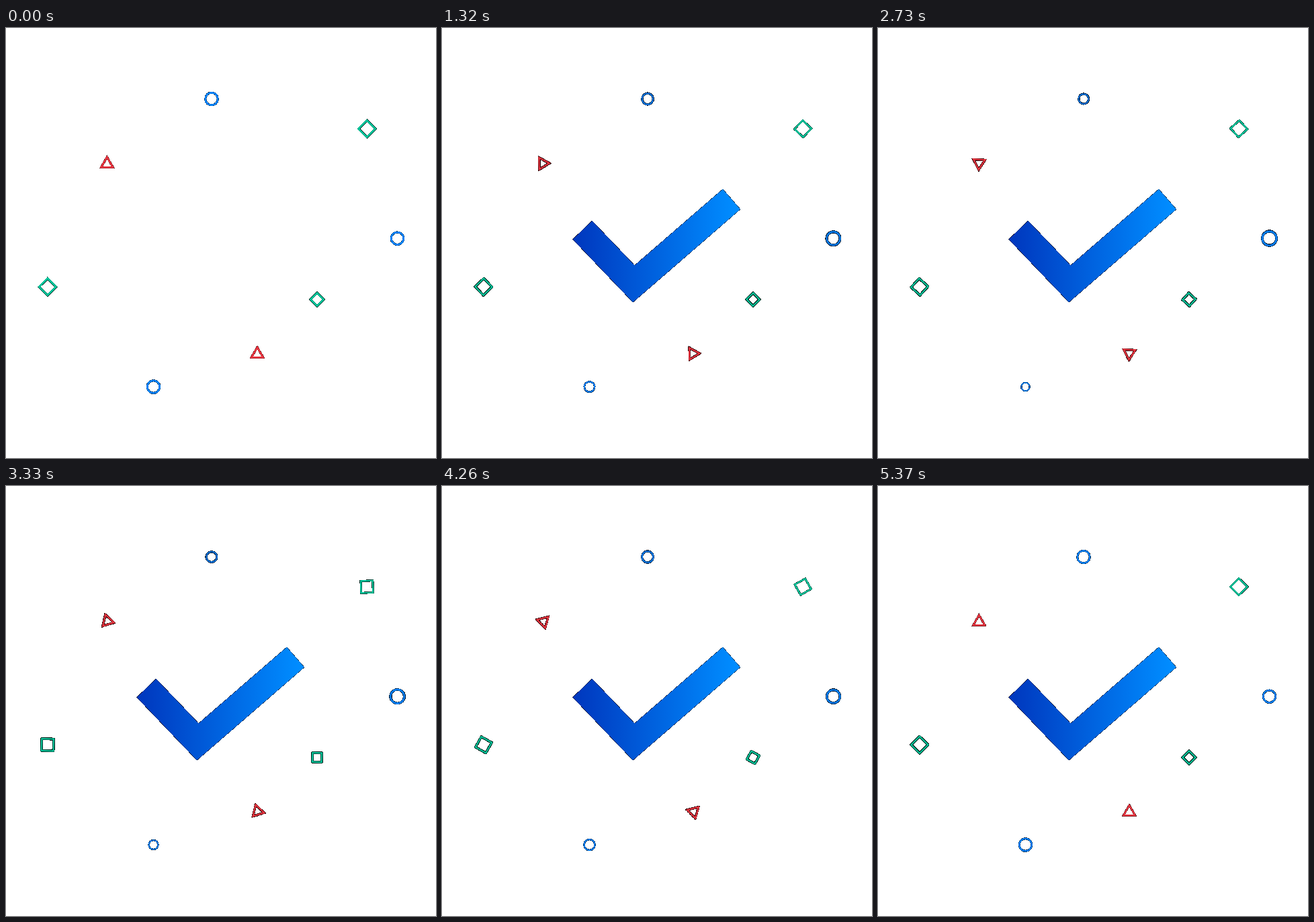
An HTML page for the animation above (5430 ms loop, 640 by 640 pixels).

```html
<!DOCTYPE html>
<html lang="en">
<head>
<meta charset="utf-8">
<title>Check mark</title>
<style>
  html, body { margin: 0; width: 100%; height: 100%; overflow: hidden; background: #fff; }
  svg { display: block; width: 100vw; height: 100vh; }
</style>
</head>
<body>
<svg viewBox="0 0 640 640" fill="none" stroke-miterlimit="10">
  <defs>
    <linearGradient id="blue" gradientUnits="userSpaceOnUse" x1="205" y1="300" x2="435" y2="300">
      <stop offset="0" stop-color="#003ac0"/>
      <stop offset="1" stop-color="#008cff"/>
    </linearGradient>
    <!-- Blends soft edges with black and makes them opaque: a hard, dark rim -->
    <filter id="rim" filterUnits="userSpaceOnUse" x="0" y="0" width="640" height="640"
            color-interpolation-filters="sRGB">
      <feFlood flood-color="#000" result="black"/>
      <feComposite in="SourceGraphic" in2="black" operator="over" result="onBlack"/>
      <feComponentTransfer in="SourceGraphic" result="mask">
        <feFuncA type="discrete" tableValues="0 1 1 1 1 1 1 1 1 1"/>
      </feComponentTransfer>
      <feComposite in="onBlack" in2="mask" operator="in"/>
    </filter>
  </defs>
  <g filter="url(#rim)">
    <g id="art"></g>
    <use id="overlay" href="#art"/>
  </g>
</svg>
<script>
const STEP = 30, LAST = 179, LOOP = 5430;
const CHECK_END = 28.3;   // step at which the tick is fully drawn
const PULSE_MID = 87;     // step at which the circles turn back
const LINE = 2.5;

const art = document.getElementById('art');
const overlay = document.getElementById('overlay');

function add(tag, stroke, attrs) {
  const el = document.createElementNS('http://www.w3.org/2000/svg', tag);
  const all = { stroke, 'stroke-width': LINE, ...attrs };
  for (const key in all) el.setAttribute(key, all[key]);
  art.append(el);
  return el;
}

function square(x, y, side, spin) {
  const box = { x: -side / 2, y: -side / 2, width: side, height: side };
  return { x, y, spin, start: 45, el: add('rect', '#00c79c', box) };
}

function triangle(x, y) {
  const r = 10.1, dx = r * Math.sqrt(3) / 2, drop = 0.7;
  const points = `0,${drop - r} ${dx},${drop + r / 2} ${-dx},${drop + r / 2}`;
  return { x, y, spin: 1, start: 0, el: add('polygon', '#ea3540', { points }) };
}

function circle(x, y, growth) {
  return { x, y, growth, el: add('circle', '#0085ff', { r: 9.25 }) };
}

const spinners = [
  square(537.2, 150, 17.8, 1),
  square(61.9, 385.2, 17.8, -1),
  square(463, 404, 13.8, -1),
  triangle(150.4, 201.5),
  triangle(374, 484.6)
];
const pulsers = [
  circle(306, 105.5, -0.21),
  circle(582.5, 313.2, 0.15),
  circle(219.5, 534, -0.34)
];

const check = add('path', 'url(#blue)', { d: 'M209 300.8L285.4 380.7L431 254.8', 'stroke-width': 39.8 });
const checkLength = check.getTotalLength();

function draw(time) {
  const step = Math.min(LAST, Math.floor((time % LOOP) / STEP));
  const angle = 360 * step / LAST;
  const pulse = step < PULSE_MID ? step / PULSE_MID : (LAST - step) / (LAST - PULSE_MID);

  for (const { el, x, y, start, spin } of spinners)
    el.setAttribute('transform', `translate(${x} ${y}) rotate(${start + spin * angle})`);
  for (const { el, x, y, growth } of pulsers)
    el.setAttribute('transform', `translate(${x} ${y}) scale(${1 + growth * pulse})`);

  check.setAttribute('stroke-dasharray', `${checkLength * Math.min(1, step / CHECK_END)} 999`);
  check.style.display = step ? '' : 'none';
  // The opening picture is painted twice, which makes its lines bolder
  overlay.style.display = step ? 'none' : '';
}

const origin = performance.now();
function tick() {
  draw(performance.now() - origin);
  requestAnimationFrame(tick);
}
draw(0);
requestAnimationFrame(tick);
</script>
</body>
</html>
```
